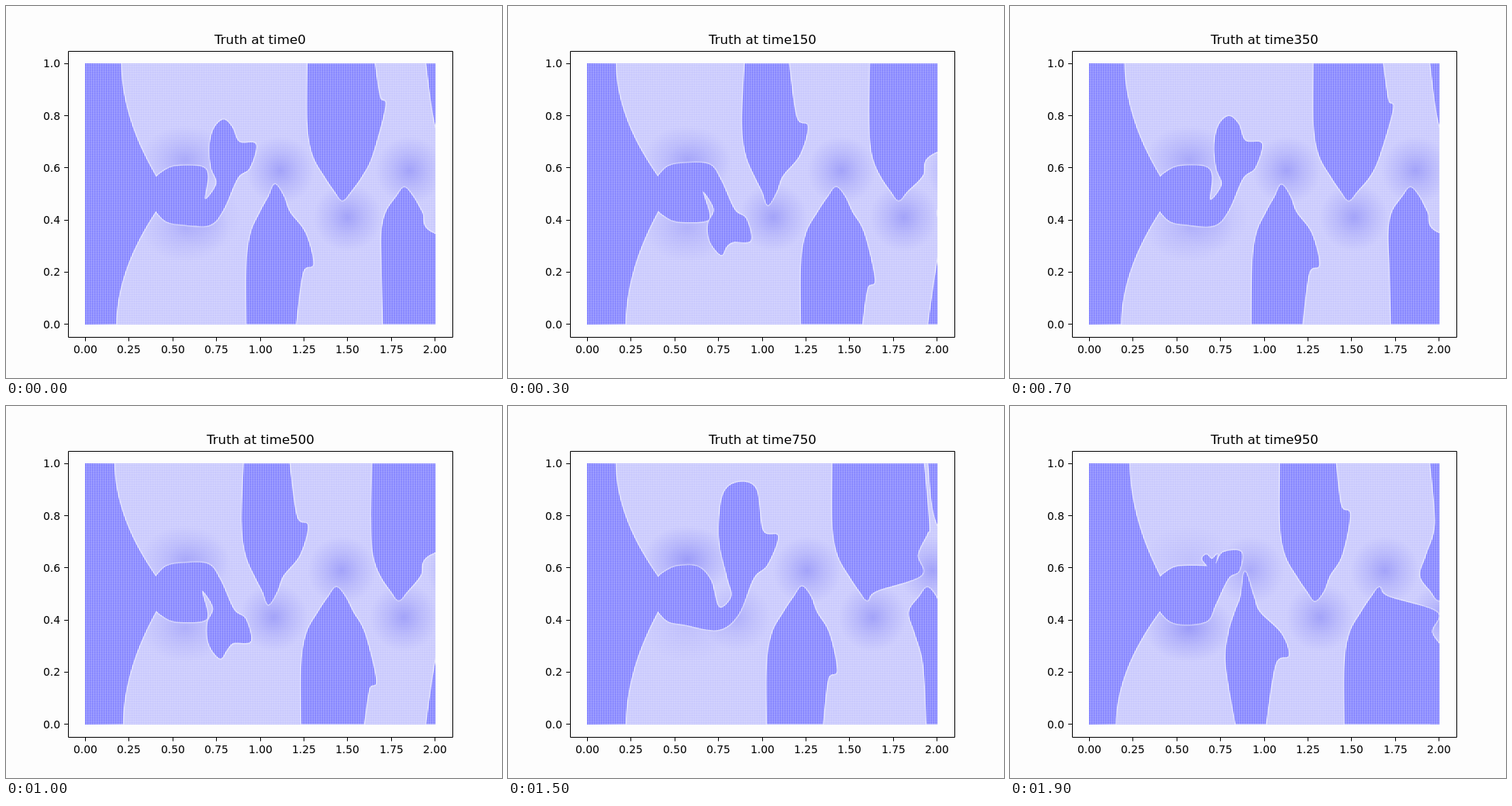
Recreate the animation shown at these times as an HTML page with a canvas. Size 640 px wide and 480 px high, loop 2000 ms.

```html
<!DOCTYPE html>
<html lang="en">
<head>
<meta charset="utf-8">
<title>Flow field</title>
<style>
  html, body { margin: 0; width: 100%; height: 100%; overflow: hidden; background: #fdfdfd; }
  svg, canvas { position: absolute; left: 0; top: 0; }
  canvas { left: 102px; top: 74px; }
  text { font: 13.89px "DejaVu Sans", sans-serif; }
  #title { font-size: 16.67px; }
  path { fill: none; stroke: #000; stroke-width: 1; }
</style>
</head>
<body>
<canvas id="field" width="452" height="337"></canvas>
<svg id="axes" width="640" height="480">
  <path d="M80.5 58.5H576.5V427.5H80.5Z"/>
  <text id="title" y="49"></text>
</svg>
<script>
const STEP_MS = 100, STEPS = 20, TIME_STEP = 50;
const PERIOD = 344, HALF = PERIOD / 2;   // shedding cycle; the lower side lags by half
const BIRTH = -82, SPLIT = 90, GONE = 822; // ages of a vortex
const W = 452, H = 337;
const svg = document.getElementById('axes');
const title = document.getElementById('title');
const ctx = document.getElementById('field').getContext('2d');

const mod = (a, n) => ((a % n) + n) % n;
const mix = (a, b, k) => a + (b - a) * k;
const clamp = (v, lo, hi) => Math.min(hi, Math.max(lo, v));
const ramp = (v, from, to) => clamp((v - from) / (to - from), 0, 1);
const wave = (time, peak) => Math.cos(2 * Math.PI * (time - peak) / PERIOD);

function toPixels([x, y], flip) {
  return [.5 + 225.5 * x, 336.5 - 336.2 * (flip ? 1 - y : y)];
}

// Catmull-Rom curve through the points, its ends joined straight.
function outline(points, flip) {
  const p = points.map(q => toPixels(q, flip));
  const path = new Path2D();
  path.moveTo(...p[0]);
  for (let i = 0; i < p.length - 1; i++) {
    const a = p[i - 1] || p[i], b = p[i], c = p[i + 1], d = p[i + 2] || c;
    path.bezierCurveTo(b[0] + (c[0] - a[0]) / 6, b[1] + (c[1] - a[1]) / 6,
                       c[0] - (d[0] - b[0]) / 6, c[1] - (d[1] - b[1]) / 6, ...c);
  }
  path.closePath();
  return path;
}

// Wake behind the obstacle: every point drifts at a steady rate while the bud grows.
function wakeShape(age, flip) {
  const t = (age < -38 ? mix(-38, age, .45) : age) / 100;
  const at = (x, y, vx, vy) => [x + vx * t, Math.min(1, y + vy * t)];
  const open = ramp(age, -75, -35);
  const lip = at(.70, .57, .01, -.03), budFoot = at(.72, .60, .13, -.06);
  const notch = point => point.map((v, i) => mix((lip[i] + budFoot[i]) / 2, v, open));
  return outline([
    [.4, .56], [.43, .58], [.51, .606],
    at(.66, .605, -.05, 0), lip,
    notch(at(.685, .48, .11, -.05)), notch(at(.75, .54, .12, -.08)), budFoot,
    at(.71, .68, .07, .05),
    at(.735, .75, .06, .2), at(.79, .785, .10, .23), at(.84, .755, .20, .24),
    at(.88, .70, .20, .07), at(.975, .69, .185, .05),
    at(.94, .60, .145, .02), at(.87, .56, .13, 0), at(.79, .44, .12, -.03), at(.71, .38, .06, -.03),
    [.55, .382], [.46, .395], [.4, .435]
  ], flip);
}

function tipX(age) {
  const u = age - SPLIT;
  return .89 + .00242 * u - 5.3e-7 * u * u;
}

// Shed vortex hanging from the wall: widths on both sides of its moving tip.
function vortexShape(age, flip) {
  const u = age - SPLIT, tip = tipX(age);
  const grow = ramp(u, -170, 140), fade = ramp(u, 385, 490);
  const young = .05 * (1 - ramp(u, 0, 130));
  const swell = .25 * Math.exp(-(((u - 335) / 55) ** 2));
  const spread = .3 * (Math.max(0, u - 200) / 150) ** 1.5;
  const tipY = .475 - .06 * Math.exp(-u / 50);
  const bumpY = .735 + .0004 * Math.min(u, 254) - .0017 * clamp(u - 254, 0, 62);
  return outline([
    [Math.min(1.95, tip - .2 * ramp(u, -40, 110) + .2 * fade), 1],
    [Math.min(2, tip - .2 * grow + .18 * fade), .77],
    [tip - .17 * grow + .1 * fade, .65],
    [tip - .105 * grow, .57],
    [tip - .045 * grow, .51],
    [tip, tipY],
    [tip + .05, .51],
    [tip + .085 + swell, .57],
    [tip + .155 + young + swell * .6, .65],
    [tip + .2 + young + spread * .7, bumpY],
    [tip + .15 + young / 2 + spread, bumpY + .035],
    [tip + .12 + spread, 1]
  ], flip);
}

function inletShape(time) {
  const path = new Path2D();
  const edge = flip => {
    const wall = .19 + .041 * wave(time, flip ? 105 : 277);
    return Array.from({ length: 23 }, (_, i) => [mix(wall, .41, (i / 22) ** 1.9), 1 - .02 * i])
      .map(p => toPixels(p, flip));
  };
  path.moveTo(-9, 0);
  [...edge(false), ...edge(true).reverse()].forEach(p => path.lineTo(...p));
  path.lineTo(-9, H);
  path.closePath();
  return path;
}

// Fine blue grid of marks, one per sample of the field.
function texture(cover, columns, rows, opaque) {
  const tile = new OffscreenCanvas(W, H);
  const c = tile.getContext('2d');
  const image = c.createImageData(W, H);
  for (let y = 0; y < H; y++) {
    for (let x = 0; x < W; x++) {
      const ink = cover * (1 + columns * Math.cos(2 * Math.PI * x / 2.266))
                        * (1 + rows * Math.cos(2 * Math.PI * y / 2.256));
      const level = opaque ? mix(253, 0, ink) : 0;
      image.data.set([level, level, 255, opaque ? 255 : 255 * ink], 4 * (y * W + x));
    }
  }
  c.putImageData(image, 0, 0);
  return tile;
}
const lightTile = texture(.185, .2, .25, false);
const darkFill = ctx.createPattern(texture(.42, .35, .15, true), 'no-repeat');

function shade(x, y, flip, alpha, stretch) {
  const [cx, cy] = toPixels([x, y], flip);
  const g = ctx.createRadialGradient(0, 0, 0, 0, 0, 44);
  g.addColorStop(0, `rgba(60,60,235,${alpha})`);
  g.addColorStop(.5, `rgba(60,60,235,${alpha * .45})`);
  g.addColorStop(1, 'rgba(60,60,235,0)');
  ctx.save();
  ctx.translate(cx, cy);
  ctx.scale(stretch, 1);
  ctx.fillStyle = g;
  ctx.fillRect(-44, -44, 88, 88);
  ctx.restore();
}

function draw(time) {
  const shapes = [inletShape(time)];
  ctx.fillStyle = '#fdfdfd';
  ctx.fillRect(0, 0, W, H);
  for (const flip of [false, true]) {
    const phase = time + (flip ? HALF : 0);
    shade(.57, .63, flip, .2 + .12 * wave(phase, 76), 1.3);
    for (let age = BIRTH + mod(phase - BIRTH, PERIOD); age < GONE; age += PERIOD) {
      shapes.push(age < SPLIT ? wakeShape(age, flip) : vortexShape(age, flip));
      shade(tipX(age) + .03, .41, flip, .27 * ramp(age, -60, 120), 1);
    }
  }
  ctx.drawImage(lightTile, 0, 0);
  ctx.strokeStyle = 'rgba(253,253,253,.4)';
  ctx.lineWidth = 3;
  shapes.forEach(s => ctx.stroke(s));
  ctx.fillStyle = darkFill;
  shapes.forEach(s => ctx.fill(s));
}

// Text starts on a whole pixel; align is 0.5 for centred, 1 for right-aligned.
function setText(node, text, x, align) {
  node.textContent = text;
  node.setAttribute('x', Math.round(x - align * node.getComputedTextLength()));
}

function addTick(d, label, x, y, align) {
  const make = name => svg.appendChild(document.createElementNS(svg.namespaceURI, name));
  make('path').setAttribute('d', d);
  const text = make('text');
  text.setAttribute('y', Math.round(y));
  setText(text, label, x, align);
}

for (let i = 0; i <= 8; i++) {
  const x = 102.5 + 56.375 * i;
  addTick(`M${Math.floor(x) + .5} 428v4.5`, (i / 4).toFixed(2), x, 448, .5);
}
for (let i = 0; i <= 5; i++) {
  const y = 410.5 - 67.24 * i;
  addTick(`M80 ${Math.floor(y) + .5}h-4.86`, (i / 5).toFixed(1), 70.3, y + 5, 1);
}

let shown = -1;
const start = performance.now();
function tick() {
  const step = Math.floor((performance.now() - start) / STEP_MS) % STEPS;
  if (step !== shown) {
    shown = step;
    setText(title, 'Truth at time' + step * TIME_STEP, 328, .5);
    draw(step * TIME_STEP);
  }
  requestAnimationFrame(tick);
}
tick();
</script>
</body>
</html>
```
